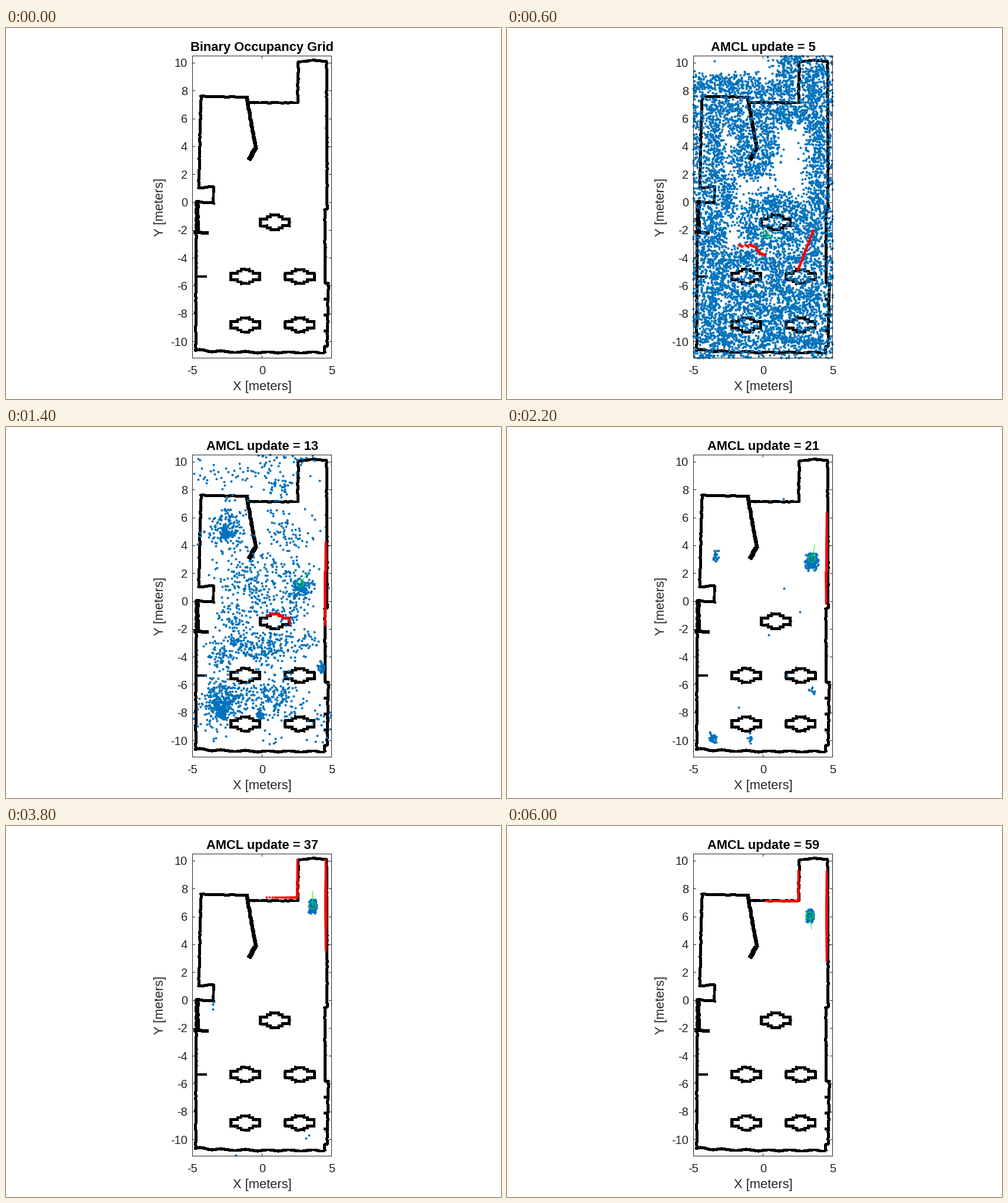
Animation, 840 px wide and 630 px high, one loop 6.1 s. Source, as a matplotlib script:

```python
import numpy as np
import matplotlib.pyplot as plt
from matplotlib.animation import FuncAnimation

W, H, DPI = 840, 630, 100
PX = 72 / DPI                      # points per pixel
FRAMES, STEP_MS = 61, 100
LEFT, RIGHT, TOP, BOTTOM = 316, 552, 47, 560
SCALE, X0, Y0 = 23.65, 434.5, 296  # pixels per metre, origin
BLUE, RED, GREEN, GREY = "#0072BD", "#FF0000", "#00FF00", "#262626"
LIDAR = 82                         # sensor range in pixels

plt.rcParams["font.family"] = "Liberation Sans"
fig = plt.figure(figsize=(W / DPI, H / DPI), dpi=DPI, facecolor="white")
ax = fig.add_axes([0, 0, 1, 1])
ax.set_xlim(0, W)
ax.set_ylim(H, 0)
ax.axis("off")
rng = np.random.default_rng(4)


# ---------- occupancy map ----------
wall_points = []


def rough(points, width=4, jitter=0.5, step=4):
    """Draw a wall as a slightly ragged polyline."""
    pts = np.array(points, float)
    out = [pts[0]]
    for a, b in zip(pts[:-1], pts[1:]):
        d = b - a
        length = np.hypot(*d)
        n = max(1, int(length / step))
        normal = np.array([-d[1], d[0]]) / length
        for k in range(1, n + 1):
            shift = rng.choice([-jitter, 0, 0, jitter]) if k < n else 0
            out.append(a + d * k / n + normal * shift)
    wall_points.extend(out)
    xs, ys = np.array(out).T
    ax.plot(xs, ys, color="black", lw=width * PX, antialiased=False,
            solid_joinstyle="miter", solid_capstyle="projecting", zorder=1)


def staircase(steps):
    """Closed outline, symmetric both ways, stepping through the corners."""
    quarter = []
    for (w, h), (w2, _) in zip(steps, steps[1:] + [(0, 0)]):
        quarter += [(w, h), (w2, h)]
    q = np.array(quarter[:-1], float)
    parts = [q, q[::-1] * (-1, 1), q * (-1, -1), q[::-1] * (1, -1), q[:1]]
    return np.concatenate(parts)


DESK = staircase([(24.5, 5.5), (13, 9), (7, 12)])
ISLAND = DESK * (1, 1.08) + (456, 330)

# left side, wavy bottom, right side, alcove
rough([(409, 118), (331, 116), (327, 271), (352, 270), (352, 297), (323, 295),
       (322, 547)])
rough([(326, 296), (327, 345)], 3)
wave_x = np.arange(322, 542, 7)
wave_y = 551 - 4 * np.exp((322 - wave_x) / 45) + 1.2 * np.sin(wave_x / 6)
rough(np.stack([wave_x, wave_y.round()], 1))
rough([(541, 550), (541, 541), (545, 540), (547, 434), (542, 433), (541, 309),
       (545, 307), (544, 57), (520, 55), (496, 58), (495, 127), (409, 127)])
rough([(409, 119), (411, 133), (424, 203)], 5.4)
rough([(421, 208), (414, 221)], 7)
rough([(321, 347), (341, 348)], 5)
rough([(324, 422), (339, 422)])
for stub_y in (460, 487, 514):
    rough([(541, stub_y), (544, stub_y)], 5)
rough(ISLAND)
for cx in (406, 498.5):
    for cy in (422, 504):
        rough(DESK + (cx, cy))


# ---------- axes frame and labels ----------
def rule(x, y):
    ax.plot(np.add(x, 0.5), np.add(y, 0.5), color=GREY, lw=PX, zorder=6,
            solid_capstyle="projecting", snap=False)


def label(x, y, text, size, ha="center", color=GREY, **kw):
    return ax.text(x, y, text, fontsize=size * PX, ha=ha, va="baseline",
                   color=color, **kw)


rule([LEFT, RIGHT, RIGHT, LEFT, LEFT], [TOP, TOP, BOTTOM, BOTTOM, TOP])
for v in range(-10, 11, 2):
    y = Y0 - v * SCALE
    for x in (LEFT, RIGHT - 4):
        rule([x, x + 4], [int(y)] * 2)
    label(308, y + 7, str(v), 20, "right")
for v in (-5, 0, 5):
    x = X0 + v * SCALE
    for y in (TOP, BOTTOM - 4):
        rule([int(x)] * 2, [y, y + 4])
    label(x, 588, str(v), 20)
label(434.5, 614.5, "X [meters]", 21.9)
label(267.5, 304, "Y [meters]", 21.9, rotation=90, rotation_mode="anchor")
title = label(434.7, 39.3, "", 21.9, color="black", weight="bold")


# ---------- robot path and lidar ----------
# frame, x, y, heading in degrees
PATH = np.array([(1, 438, 295, 0), (6, 468, 291, -3), (10, 491, 286, 46),
                 (22, 517, 224, 77), (42, 521, 120, 92), (52, 514, 118, 229),
                 (60, 514, 152, 277)], float)


def true_pose(i):
    x, y, a = (np.interp(i, PATH[:, 0], PATH[:, k]) for k in (1, 2, 3))
    return np.array([x, y]), a


def turn(v, deg):
    c, s = np.cos(np.radians(deg)), np.sin(np.radians(deg))
    return v @ np.array([[c, -s], [s, c]])


def guess(i):
    """Estimated position and heading error; wrong until the filter settles."""
    pos, _ = true_pose(i)
    if i >= 14:
        return pos + (0, np.interp(i, [22, 38, 42], [0, -6, 0])), 0
    ref, spot, err = (6, (438, 350), -21) if i < 8 else (10, (453, 433), 99.7)
    return np.array(spot) + turn(pos - true_pose(ref)[0], err), err


room = [(541, 433), (542, 56), (494, 56), (494, 126.5), (409, 126.5)]
P = np.array(room[:-1] + list(ISLAND[:-1]))
Q = np.array(room[1:] + list(ISLAND[1:])) - P


def scan(pos):
    """Wall hits around pos, relative to it."""
    a = np.radians(np.arange(0, 360, 0.7))
    d = np.stack([np.cos(a), np.sin(a)], 1)
    r = P - pos
    cross = d[:, :1] * Q[:, 1] - d[:, 1:] * Q[:, 0]
    cross = np.where(np.abs(cross) < 1e-9, 1e-9, cross)
    t = (r[:, 0] * Q[:, 1] - r[:, 1] * Q[:, 0]) / cross
    u = (r[:, 0] * d[:, 1:] - r[:, 1] * d[:, :1]) / cross
    dist = np.where((t > 0) & (u >= 0) & (u <= 1), t, np.inf).min(1)
    hit = dist < LIDAR
    return d[hit] * dist[hit, None]


# ---------- particles ----------
CELL = 3
gx, gy = np.meshgrid(np.arange(LEFT, RIGHT + CELL, CELL),
                     np.arange(TOP, BOTTOM + CELL, CELL))
clearance = np.full(gx.shape, np.inf)   # distance to the nearest wall
for px, py in wall_points:
    clearance = np.minimum(clearance, np.hypot(gx - px, gy - py))


def sample(n, weight):
    """Random points whose density follows weight(x, y, clearance)."""
    p = rng.uniform((LEFT, TOP), (RIGHT, BOTTOM), (12 * n, 2))
    col, row = ((p - (LEFT, TOP)) / CELL).round().astype(int).T
    keep = rng.random(len(p)) < weight(*p.T, clearance[row, col])
    return p[keep][:n]


def inside(x, y, d):
    hall = (x > 330) & (x < 542) & (y > 122) & (y < 547)
    return hall | ((x > 497) & (x < 541) & (y > 58) & (y < 125))


def near_walls(x, y, d):
    return np.exp(-((d - 20) / 16) ** 2)


def mid_room(x, y, d):
    return np.exp(-((d - 38) / 15) ** 2) * np.where(y > 340, 1, 0.4)


def clumps(parents, mean, blur):
    """Resampled offspring: each parent leaves a random number of copies."""
    sizes = rng.exponential(mean, len(parents)).astype(int) + 1
    pts = np.repeat(parents, sizes, axis=0)
    return pts + rng.normal(0, blur, pts.shape)


class Cloud:
    """Particles that drift along their own heading and thin out by rank."""

    def __init__(self, pts, ref, times, share):
        self.pts, self.ref, self.times, self.share = pts, ref, times, share
        self.rank = rng.random(len(pts))
        a = rng.random(len(pts)) * 2 * np.pi
        self.vel = 3.5 * np.stack([np.cos(a), np.sin(a)], 1)

    def at(self, i):
        keep = self.rank < np.interp(i, self.times, self.share)
        return self.pts[keep] + self.vel[keep] * (i - self.ref)


hot = np.repeat([(460, 455), (497, 295), (375, 460), (375, 160)], 10, axis=0)
parents = np.concatenate([sample(190, mid_room),
                          hot + rng.normal(0, 13, hot.shape)])
CLOUDS = [Cloud(sample(9000, inside), 1, [1, 6], [1, 0]),
          Cloud(sample(7500, near_walls), 6, [2, 6, 10], [0, 1, 0]),
          Cloud(clumps(parents, 24, 7), 10, [6, 10, 13, 20], [0, 1, 0.4, 0])]

# rival clusters at frame 22 that travel opposite to the robot: x, y, count
RIVALS = [(353, 220, 20), (517, 448, 9), (349, 527, 36), (414, 528, 10)]
rivals = [np.clip(rng.normal(0, 1, (4 * n, 2)), -2, 2) * (3, 5) + (x, y)
          for x, y, n in RIVALS]
rivals.append(sample(28, inside))
MAIN = np.clip(rng.normal(0, 1, (260, 2)), -2.3, 2.3)
HOME = true_pose(22)[0]


def particles(i):
    parts = [c.at(i) for c in CLOUDS]
    pos, _ = true_pose(i)
    share = np.interp(i, [11, 14, 22, 36, 43], [0, 1, 0.25, 0.06, 0])
    for pts in rivals:
        rank = (np.arange(len(pts)) + 0.5) / len(pts)
        parts.append(pts[rank < share] - (pos - HOME))
    if i > 11:
        n = int(len(MAIN) * min(1, (i - 11) / 7))
        sx = 2.5 + 7 * np.exp((12 - i) / 8)
        loose = 8 * np.exp((12 - i) / 14)
        wobble = np.random.default_rng(i).normal(0, 0.15, (n, 2))
        centre = np.array([pos[0], guess(i)[0][1] + loose])
        parts.append(centre + (MAIN[:n] + wobble) * (sx, 4.5 + loose / 2))
    p = np.concatenate(parts)
    x, y = p.T
    return p[(x >= LEFT) & (x <= RIGHT) & (y >= TOP) & (y <= BOTTOM)]


# ---------- animation ----------
def dots(color, z):
    return ax.plot([], [], "o", color=color, ms=4 * PX, mew=0, zorder=z)[0]


swarm, beams = dots(BLUE, 2), dots(RED, 3)
ring, nose = (ax.plot([], [], color=GREEN, lw=PX, zorder=4)[0]
              for _ in range(2))
angle = np.linspace(0, 2 * np.pi, 40)
circle = 6 * np.stack([np.cos(angle), np.sin(angle)])
moving = [swarm, beams, ring, nose]


def draw(i):
    for art in moving:
        art.set_visible(i > 0)
    if i == 0:
        title.set_text("Binary Occupancy Grid")
        return moving + [title]
    title.set_text(f"AMCL update = {i - 1}")
    pos, heading = true_pose(i)
    spot, err = guess(i)
    swarm.set_data(*particles(i).T)
    beams.set_data(*(spot + turn(scan(pos), err)).T)
    ring.set_data(circle[0] + spot[0], circle[1] + spot[1])
    a = np.radians(heading + err)
    nose.set_data([spot[0], spot[0] + SCALE * np.cos(a)],
                  [spot[1], spot[1] - SCALE * np.sin(a)])
    return moving + [title]


anim = FuncAnimation(fig, draw, frames=FRAMES, init_func=lambda: draw(0),
                     interval=STEP_MS, repeat=True, repeat_delay=0)
plt.show()
```
